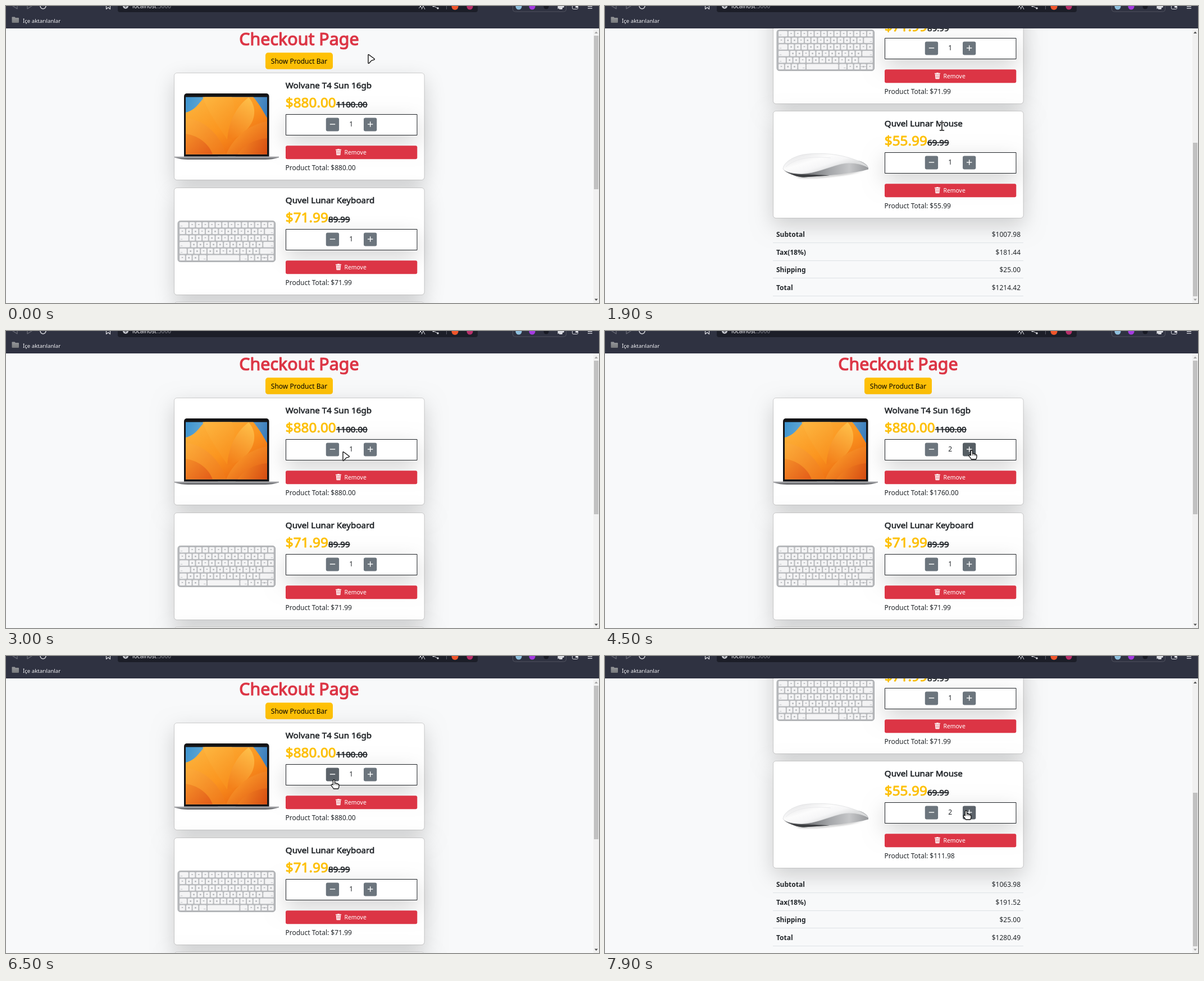
Recreate the animation shown at these times as an HTML page with a canvas. Size 1056x530 px, loop 8 s.

```html
<!DOCTYPE html>
<html lang="en">
<head>
<meta charset="utf-8">
<title>Checkout Page</title>
<style>
  html, body { margin: 0; width: 100%; height: 100%; overflow: hidden; background: #f8f9fa; }
  canvas { display: block; }
</style>
</head>
<body>
<canvas id="stage" width="1056" height="530"></canvas>
<script>
const ctx = document.getElementById('stage').getContext('2d');
const LOOP = 8000, STEP = 100, MAX_SCROLL = 341;
const INK = '#212529', RED = '#dc3545', YELLOW = '#ffc107', GREY = '#6c757d';

const products = [
  { name: 'Wolvane T4 Sun 16gb', full: 1100, y: 0, picture: laptop },
  { name: 'Quvel Lunar Keyboard', full: 89.99, y: 205, picture: keyboard },
  { name: 'Quvel Lunar Mouse', full: 69.99, y: 409, picture: mouse }
];

// first step, last step, x, y
const moves = [
  [500, 1100, 602, 202], [1900, 1900, 600, 215], [3200, 3200, 599, 215],
  [3700, 3800, 626, 203], [3900, 3900, 662, 208], [4000, 4000, 665, 213],
  [4200, 4300, 653, 213], [5200, 5500, 598, 213], [5700, 5800, 583, 213],
  [6500, 6500, 584, 221], [6700, 6700, 585, 223], [6900, 7100, 610, 235],
  [7300, 7600, 643, 276]
];
// time, scroll offset
const scrolls = [[0, 0], [1900, 341], [2800, 213], [2900, 60], [3000, 0], [6600, 128], [6700, 256], [6800, 341]];
// time, product, change, press length
const clicks = [[4500, 0, 1, 200], [4900, 0, 1, 100], [6000, 0, -1, 100], [6300, 0, -1, 100], [7800, 2, 1, 100]];

function stateAt(t) {
  let x = 645, y = 86;
  for (const [a, b, tx, ty] of moves) {
    if (t < a) break;
    const p = Math.min(1, (t - a + STEP) / (b - a + STEP));
    x += (tx - x) * p;
    y += (ty - y) * p;
  }
  const scroll = scrolls.filter(s => s[0] <= t).pop()[1];
  const qty = [1, 1, 1];
  let pressed = false;
  for (const [at, i, change, hold] of clicks) {
    if (t < at) break;
    qty[i] += change;
    pressed = t < at + hold;
  }
  return { x: Math.round(x), y: Math.round(y), scroll, qty, pressed };
}

function box(x, y, w, h, r, fill, stroke) {
  ctx.beginPath();
  ctx.roundRect(x, y, w, h, r);
  if (fill) { ctx.fillStyle = fill; ctx.fill(); }
  if (stroke) { ctx.strokeStyle = stroke; ctx.lineWidth = 1; ctx.stroke(); }
}

function text(s, x, y, size, color = INK, weight = 400, align = 'left') {
  ctx.font = `${weight} ${size}px "Noto Sans", "Open Sans", sans-serif`;
  ctx.textAlign = align;
  ctx.fillStyle = color;
  ctx.fillText(s, x, y);
  return ctx.measureText(s).width;
}

// Medium weight: regular glyphs thickened by a fine outline
function medium(s, x, y, size, color, align) {
  const w = text(s, x, y, size, color, 400, align);
  ctx.strokeStyle = color;
  ctx.lineWidth = size * .04;
  ctx.lineJoin = 'round';
  ctx.strokeText(s, x, y);
  return w;
}

function shape(d, fill, stroke, width = 1) {
  const p = new Path2D(d);
  if (fill) { ctx.fillStyle = fill; ctx.fill(p); }
  if (stroke) { ctx.strokeStyle = stroke; ctx.lineWidth = width; ctx.stroke(p); }
}

function dot(x, y, r, color) {
  ctx.beginPath();
  ctx.arc(x, y, r, 0, 7);
  ctx.fillStyle = color;
  ctx.fill();
}

function ramp(x0, y0, x1, y1, ...colors) {
  const g = ctx.createLinearGradient(x0, y0, x1, y1);
  colors.forEach((c, i) => g.addColorStop(i / (colors.length - 1), c));
  return g;
}

function raised(paint) {
  ctx.save();
  ctx.shadowColor = 'rgba(0,0,0,.175)';
  ctx.shadowBlur = 37;
  ctx.shadowOffsetY = 12.4;
  paint();
  ctx.restore();
}

function laptop() {
  box(317, 156, 151.5, 114, [5, 5, 0, 0], '#141416');
  ctx.save();
  ctx.beginPath();
  ctx.rect(320, 162.5, 145, 102);
  ctx.clip();
  ctx.fillStyle = ramp(320, 163, 465, 200, '#3c93cf', '#8fc0d8', '#3579ba');
  ctx.fillRect(320, 162, 145, 103);
  shape('M320 190C338 186 344 172 354 162H440C452 176 458 188 465 200V265H320Z',
    ramp(360, 165, 420, 265, '#fcae38', '#fb951f', '#ea6611'));
  shape('M350 162C360 190 378 214 394 238C408 204 410 182 402 162Z', ramp(352, 165, 400, 230, '#fdb53f', '#f88f1c'));
  shape('M394 240C396 204 412 178 432 163C452 184 444 226 394 240Z', ramp(400, 235, 440, 165, '#f3801a', '#ffc14a'));
  shape('M320 200C350 202 380 226 392 265H320Z', ramp(320, 196, 380, 265, '#fdae3c', '#f07a1a'));
  shape('M320 228C346 232 362 248 368 265H320Z', ramp(320, 222, 360, 265, '#f6922a', '#e4601a'));
  shape('M392 265C404 236 430 212 465 206V265Z', ramp(410, 215, 450, 265, '#fb9c2a', '#e35d14'));
  shape('M412 265C424 248 442 238 465 236V265Z', ramp(420, 240, 465, 265, '#f28422', '#d64c12'));
  ctx.restore();
  shape('M300 268.5H486V270.5C478 273 470 274 462 274H324C316 274 308 273 300 270.5Z',
    ramp(0, 268, 0, 274, '#c9cacc', '#8b8c90', '#4a4b4e'));
  box(377, 268.5, 32, 2, [0, 0, 2, 2], '#9fa0a3');
}

function keyboard() {
  box(306, 178.5, 173.5, 73, 4.5, '#b9bbbe', '#a6a8ab');
  const ones = n => Array(n).fill(1);
  const rows = [
    [1.5, ...ones(13)], [...ones(13), 1.5], [1.5, ...ones(13)], [1.75, ...ones(11), 1.75],
    [1.25, ...ones(11), 2.25], [1, 1, 1, 1.25, 5, 1.25, 1, 1, 1, 1]
  ];
  const unit = 169.5 / 14.5;
  rows.forEach((row, r) => {
    let x = 308.3;
    const y = 180.8 + r * 11.75;
    row.forEach((u, i) => {
      const w = u * unit;
      box(x + .9, y, w - 2, 9.5, 1.6, '#f4f4f5');
      if (u === 1) {
        ctx.fillStyle = '#b4b6ba';
        ctx.fillRect(x + w / 2 - 1.4, y + 3.4, 2.6, r && i % 3 ? 2.6 : 1.6);
      } else if (u < 3) {
        ctx.fillStyle = '#c4c6ca';
        ctx.fillRect(x + (i ? w - 6 : 2.5), y + 6.4, 3.5, 1);
      }
      x += w;
    });
  });
  ctx.fillStyle = '#b9bbbe';
  ctx.fillRect(454.5, 243.6, 11, 1);
}

function mouse() {
  ctx.save();
  ctx.filter = 'blur(1.5px)';
  shape('M330 232C350 242 400 236 462 226L440 231C405 237 362 241 345 238Z', 'rgba(0,0,0,.35)');
  ctx.restore();
  shape('M317 222C320 229 336 236 354 237.5C395 235 444 231 469 223.5C470 218 464 212 452 208L390 206Z',
    ramp(330, 0, 470, 0, '#5a5c5f', '#77797c', '#a4a6a9', '#c6c7c9', '#97999c'));
  shape('M330 231.5C340 236 348 237.5 354 237.5L400 234.4C384 233 352 233 330 231.5Z', '#3c3e41');
  // Glossy cover above the darker underside
  shape('M317 222.5C318 212 333 201 354 197C378 193.5 408 195 432 202C450 207 464 213 468.5 220C456 213 438 210 420 214C396 220 374 231 350 231.5C334 231 320 228 317 222.5Z',
    ramp(370, 194, 382, 232, '#ededee', '#fcfcfc', '#f6f6f7', '#dcddde'), '#dcdddf', .7);
  shape('M322 219C340 202 372 200 402 203', null, '#e8e8ea', .8);
}

function trash() {
  ctx.fillStyle = '#fff';
  ctx.fillRect(590.3, 255, 3.4, 1.2);
  box(587, 255.8, 10, 1.8, .7, '#fff');
  shape('M587.8 258.2H596.2L595.6 265.4Q595.5 266.2 594.6 266.2H589.4Q588.5 266.2 588.4 265.4Z', '#fff');
  ctx.fillStyle = RED;
  for (const x of [589.6, 591.7, 593.8]) ctx.fillRect(x, 259.4, .7, 5.2);
}

const isOver = (s, p, x) => {
  const y = s.y - p.y + s.scroll;
  return s.x >= x && s.x <= x + 23.5 && y >= 199 && y <= 223.5;
};

function stepButton(s, p, x, plus) {
  const color = isOver(s, p, x) ? (s.pressed ? '#565e64' : '#5c636a') : GREY;
  box(x, 199.5, 23.3, 24, 3, color);
  ctx.fillStyle = '#fff';
  ctx.fillRect(x + 7, 210.3, 9.4, 1.4);
  if (plus) ctx.fillRect(x + 11, 206.3, 1.4, 9.4);
}

function card(s, p, qty) {
  const price = p.full * .8;
  ctx.save();
  ctx.translate(0, p.y - s.scroll);
  raised(() => box(299.5, 119.5, 445.5, 191, 5, '#fff'));
  box(299.5, 119.5, 445.5, 191, 5, null, 'rgba(0,0,0,.175)');
  p.picture();
  medium(p.name, 497.8, 147, 15.2, INK);
  const w = medium('$' + price.toFixed(2), 497.8, 181, 24.3, YELLOW);
  const old = p.full.toFixed(2), x = 498 + w;
  const oldWidth = medium(old, x, 181, 15.1, INK);
  ctx.fillRect(x, 175, oldWidth, 1.5);
  raised(() => box(498, 193, 234, 38, 0, '#fff'));
  box(498.5, 193.5, 233.5, 37, 0, null, INK);
  stepButton(s, p, 569.8, false);
  stepButton(s, p, 637, true);
  text(qty, 614.8, 215, 12, INK, 400, 'center');
  box(498, 249.3, 234.3, 24, 3, RED);
  trash();
  text('Remove', 602.5, 265, 10.4, '#fff');
  text('Product Total: $' + (price * qty).toFixed(2), 497.5, 293, 12);
  ctx.restore();
}

function summary(s) {
  const sub = products.reduce((sum, p, i) => sum + p.full * .8 * s.qty[i], 0);
  const tax = sub * .18;
  const rows = [['Subtotal', sub], ['Tax(18%)', tax], ['Shipping', 25], ['Total', sub + tax + 25]];
  rows.forEach(([label, value], i) => {
    const y = Math.round(753 + i * 31.7) - s.scroll;
    text(label, 305, y, 12, INK, 700);
    text('$' + value.toFixed(2), 740, y, 12, INK, 400, 'right');
    ctx.fillStyle = '#dee2e6';
    ctx.fillRect(299, y + 10, 446, 1);
  });
}

function page(s) {
  ctx.fillStyle = '#f8f9fa';
  ctx.fillRect(0, 0, 1056, 530);
  medium('Checkout Page', 522, 70 - s.scroll, 30.4, RED, 'center');
  box(462, 83.3 - s.scroll, 120, 29.5, 4.6, YELLOW);
  text('Show Product Bar', 522, 103 - s.scroll, 12, '#000', 400, 'center');
  products.forEach((p, i) => card(s, p, s.qty[i]));
  summary(s);
}

function scrollbar(scroll) {
  ctx.fillStyle = '#f1f1f1';
  ctx.fillRect(1046, 40, 10, 490);
  ctx.fillStyle = '#c1c1c1';
  ctx.fillRect(1047, 53 + Math.round(scroll * .56), 8, 274);
  shape('M1048 49L1051 45.5L1054 49Z', scroll > 0 ? '#505050' : '#a3a3a3');
  shape('M1048 522.5L1051 526L1054 522.5Z', scroll < MAX_SCROLL ? '#505050' : '#a3a3a3');
}

function toolbar() {
  const light = '#d9dae0', dim = '#6b6d78';
  ctx.fillStyle = '#2f3241';
  ctx.fillRect(0, 0, 1056, 40);
  box(199, -12, 641, 23, 4, '#1c1e28');
  shape('M20 -4L12 0L20 5Z', null, dim, 1.2);
  shape('M38 -4L46 0L38 5Z', null, dim, 1.2);
  shape('M61 0A5 5 0 0 0 71 0', null, light, 1.5);
  shape('M178.5 -4V5.5L182 2.5L185.5 5.5V-4', null, light, 1.2);
  dot(213, 0, 5, '#c3c5cc');
  shape('M210 0H216M213 -3V3', null, '#1c1e28', 1);
  const w = text('localhost', 225, 4, 10.2, '#eeeef2');
  text(':3000', 225 + w, 4, 10.2, '#85868f');
  shape('M735 -2L741 4M741 -2L735 4M740 6L743 0L746 6', null, light, 1);
  shape('M769 -3L761 0L769 4', null, light, 1);
  dot(769, 4, 1.7, light);
  dot(761, 0, 1.7, light);
  ctx.fillStyle = '#5a5c68';
  ctx.fillRect(784, 0, 1, 6);
  dot(799.5, 1, 6, '#f1562b');
  dot(826, 1, 5.5, '#b8306b');
  box(902.5, -10, 95, 20, 4, null, '#50535f');
  dot(913, 1, 5.5, '#8fc0de');
  dot(937, 1, 5.5, '#a43be0');
  dot(962, 1, 4.5, '#171923');
  box(982.5, -3, 8.5, 9, 1.5, light);
  dot(992, 1, 2, light);
  dot(984, 6, 1.4, '#2f3241');
  box(1008.5, -4, 10, 9.5, 2, null, light);
  box(1014, 0, 5, 3, 1, light);
  ctx.fillStyle = light;
  ctx.fillRect(1036, 0, 8, 1.3);
  ctx.fillRect(1036, 3.5, 8, 1.3);
  shape('M11 19.5H15.5L17 21H22Q23 21 23 22V29Q23 30 22 30H11.5Q10.5 30 10.5 29V20Q10.5 19.5 11 19.5Z',
    ramp(0, 19, 0, 30, '#97999c', '#77797c'));
  text('İçe aktarılanlar', 30, 29.5, 9.6, '#f2f2f5');
}

function cursor(s) {
  const overButton = products.some(p => isOver(s, p, 569.8) || isOver(s, p, 637));
  const overText = s.x < 640 && products.some(p => {
    const y = s.y - p.y + s.scroll;
    return (y >= 134 && y <= 152) || (y >= 158 && y <= 187) || (y >= 274 && y <= 298);
  });
  ctx.save();
  ctx.translate(s.x, s.y);
  ctx.lineJoin = ctx.lineCap = 'round';
  if (overButton) {
    shape('M-1.6 9V1.5Q-1.6 0 0 0Q1.5 0 1.5 1.5V5.8Q3.8 5 4.3 6.6Q6.4 5.8 6.9 7.6Q9 7.2 9 9.2V11.5Q9 13.4 7.6 16H-.6Q-2 13.4 -4.6 10.4Q-5.4 8.8 -4 8.2Q-2.8 8 -1.6 9Z',
      '#fff', '#111', 1.3);
    shape('M1.5 6V9M4.3 6.8V9.2M6.9 7.8V9.6', null, '#111', .8);
  } else if (overText) {
    const beam = 'M-3.5 -7H-1.2Q0 -7 0 -6Q0 -7 1.2 -7H3.5M0 -6V6M-3.5 7H-1.2Q0 7 0 6Q0 7 1.2 7H3.5';
    shape(beam, null, '#fff', 3.4);
    shape(beam, null, '#111', 1.6);
  } else {
    shape('M0 1.2Q0 .2 1 .8L11 8.2Q11.8 9.2 10.6 9.8L5.8 11.4L1.6 16Q.2 17 0 15.6Z', '#fff', '#111', 1.4);
  }
  ctx.restore();
}

const start = performance.now();
let shown = -1;
function tick() {
  const step = Math.floor((performance.now() - start) % LOOP / STEP) * STEP;
  if (step !== shown) {
    shown = step;
    const s = stateAt(step);
    page(s);
    scrollbar(s.scroll);
    toolbar();
    cursor(s);
  }
  requestAnimationFrame(tick);
}
tick();
</script>
</body>
</html>
```
